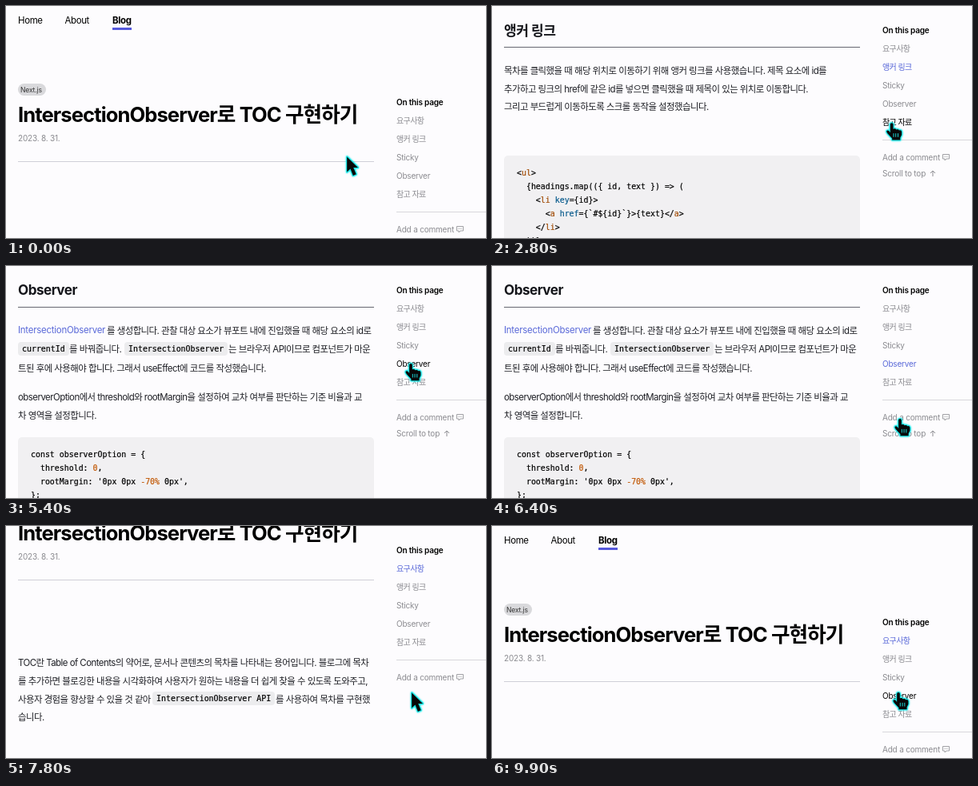
Animation, 600 px wide and 290 px high, one loop 10 s. Source, as an HTML page:

```html
<!DOCTYPE html>
<html lang="ko">
<head>
<meta charset="utf-8">
<style>
html, body { margin: 0; width: 100%; height: 100%; overflow: hidden; }
body { position: relative; background: #fdfcfe; color: #1e1f25; font: 11.43px/20px Inter, "Noto Sans CJK KR", "Noto Sans CJK", sans-serif; }
#page, #toc { position: absolute; left: 0; top: 0; width: 600px; }
.t { position: absolute; white-space: pre; letter-spacing: -.02em; }
.ko { letter-spacing: -.046em; margin-top: .8px; }
.nav { color: #000; letter-spacing: -.03em; }
.on { font-weight: 700; }
.title { font-size: 25.6px; font-weight: 700; color: #000; letter-spacing: -.036em; }
.h2 { font-size: 17.1px; font-weight: 700; color: #15161b; letter-spacing: -.03em; }
.small { font-size: 10px; color: #8b8b90; }
.badge { font-size: 8.57px; color: #333; }
.head { font-size: 10px; font-weight: 600; color: #000; }
.small.ko { letter-spacing: -.06em; margin-top: 0; }
.link { color: #5968d8; }
.c, pre { font-family: "DejaVu Sans Mono", monospace; font-size: 9.92px; letter-spacing: 0; color: #000; -webkit-text-stroke: .2px; }
.c { line-height: 17px; margin: 1.5px 0 0 -5px; padding: 0 5px; border-radius: 4px; background: #ececee; }
.box { position: absolute; }
pre { position: absolute; left: 15px; width: 429px; margin: 0; padding: 13px 0 13px 16px; line-height: 17px; border-radius: 5px; background: #f1f0f2; }
.tag { color: #a04a04; } .attr { color: #075a8c; } .str { color: #3d6a00; } .num { color: #c25a08; }
svg { position: absolute; overflow: visible; fill: none; }
#cursor { left: 0; top: 0; filter: drop-shadow(0 0 1px #0ee); }
#cursor path { fill: #080808; stroke: #1ee6e6; stroke-width: 2.4; stroke-linejoin: round; paint-order: stroke; }
#cursor .gap { stroke-width: 1; }
</style>
</head>
<body>
<div id="page"></div>
<div id="toc"></div>
<svg id="cursor" width="1" height="1">
  <path id="arrow" transform="translate(-.8 .5) scale(.96 1)" d="M0 0V19l4.5-4 3.5 8.5 4-1.7-3.6-8.3h6z"/>
  <g id="hand" transform="scale(.92)">
    <path d="M-2 2a2 2 0 0 1 4 0v6q3-1 4 1 3-1 4 1 3-1 3.5 2v4l-2 4v3H.5v-2l-6-6.500q-3-4 0-4.500 2 0 3.500 3z"/>
    <path class="gap" d="M2.500 14v5M5.500 14v5M8.500 14v5"/>
  </g>
</svg>
<script>
const $ = id => document.getElementById(id);
let layer = $('page');

function add(html) {
  layer.insertAdjacentHTML('beforeend', html);
  return layer.lastElementChild;
}
// Text whose line is centred on y
function text(x, y, str, cls = '') {
  const ko = /[가-힣]/.test(str) ? 'ko' : '';
  return add(`<div class="t ${ko} ${cls}" style="left:${x}px;top:${y - 10}px">${str}</div>`);
}
const box = (x, y, w, h, color, r = 0) =>
  add(`<div class="box" style="left:${x}px;top:${y}px;width:${w}px;height:${h}px;background:${color};border-radius:${r}px"></div>`);
const inline = (x, y, str) => text(x, y, str, 'c');
const lines = (y, step, list) => list.forEach((s, i) => text(15, y + i * step, s));

function heading(y, str) {
  text(15, y, str, 'h2');
  box(15, y + 21, 445, 1, '#666770');
}
function code(y, src) {
  const span = (cls, s) => `<span class="${cls}">${s}</span>`;
  const token = /(<\/?)(\w+)|(\w+)(?==['{])|('[^']*'(?=>))|(-\d+%|\b0(?=,))/g;
  const html = src.replace(token, (m, open, tag, attr, str, num) =>
    tag ? open.replace('<', '&lt;') + span('tag', tag) :
    attr ? span('attr', attr) : str ? span('str', str) : span('num', num));
  add(`<pre style="top:${y}px">${html}</pre>`);
}

const heads = [480, 720, 1145, 1530];
const names = ['요구사항', '앵커 링크', 'Sticky', 'Observer', '참고 자료'];

// Page header and introduction
text(15, 18, 'Home', 'nav');
text(73.5, 18, 'About', 'nav');
text(133, 18, 'Blog', 'nav on');
box(133, 27, 24, 3, '#5558dc');
box(15, 97, 34.5, 15, '#d9d9dc', 7.5);
text(18, 104.5, 'Next.js', 'badge');
text(15, 135, 'IntersectionObserver로 TOC 구현하기', 'title');
text(15, 164.5, '2023. 8. 31.', 'small');
box(15, 194, 445, 1, '#cfcfd8');
lines(297, 22.9, [
  'TOC란 Table of Contents의 약어로, 문서나 콘텐츠의 목차를 나타내는 용어입니다. 블로그에 목차',
  '를 추가하면 블로깅한 내용을 시각화하여 사용자가 원하는 내용을 더 쉽게 찾을 수 있도록 도와주고,',
  '사용자 경험을 향상할 수 있을 것 같아',
  '습니다.']);
inline(188, 342, 'IntersectionObserver API');
text(337, 342.8, '를 사용하여 목차를 구현했');

heads.forEach((y, i) => heading(y, names[i]));

lines(530, 22.8, [
  '• 목차를 클릭하면 해당 위치로 이동한다.',
  '• 스크롤 하는 동안 목차가 화면에 유지된다.',
  '• 현재 보고 있는 위치를 목차에 표시한다.']);

lines(770, 22.8, [
  '목차를 클릭했을 때 해당 위치로 이동하기 위해 앵커 링크를 사용했습니다. 제목 요소에 id를',
  '추가하고 링크의 href에 같은 id를 넣으면 클릭했을 때 제목이 있는 위치로 이동합니다.',
  '그리고 부드럽게 이동하도록 스크롤 동작을 설정했습니다.']);
code(877, `<ul>
  {headings.map(({ id, text }) => (
    <li key={id}>
      <a href={\`#\${id}\`}>{text}</a>
    </li>
  ))}
</ul>`);

text(15, 1195, '사용자가 스크롤 하는 동안 뷰포트에 TOC를 유지하기 위해');
inline(282, 1195.5, 'position: sticky; top: 0;');
text(440, 1195, '을 추');
text(15, 1218.5, '가했습니다. 그리고 TOC 컴포넌트의 부모가');
inline(218, 1219, 'flex');
text(246, 1218.5, '컨테이너라 section의 높이가 늘려져서');
inline(20, 1242.5, 'position: sticky');
text(121, 1242.5, '가 무시됐습니다. 그래서 늘어나지 않도록 하기 위해');
inline(355, 1242.5, 'align-self: flex-');
inline(15, 1266.5, 'start').style.cssText += 'margin-left:0;padding-left:0';
text(53, 1266.5, '를 추가했습니다.');
code(1296, `<section className='sticky top-0 self-start'>
    <ul>
        ...
    </ul>
</section>`);

text(15, 1580, 'IntersectionObserver', 'link');
text(126, 1580, '를 생성합니다. 관찰 대상 요소가 뷰포트 내에 진입했을 때 해당 요소의 id로');
inline(20, 1603, 'currentId');
text(79, 1603, '를 바꿔줍니다.');
inline(153, 1603, 'IntersectionObserver');
text(278, 1603, '는 브라우저 API이므로 컴포넌트가 마운');
text(15, 1627, '트된 후에 사용해야 합니다. 그래서 useEffect에 코드를 작성했습니다.');
lines(1663, 23, [
  'observerOption에서 threshold와 rootMargin을 설정하여 교차 여부를 판단하는 기준 비율과 교',
  '차 영역을 설정합니다.']);
code(1714, `const observerOption = {
  threshold: 0,
  rootMargin: '0px 0px -70% 0px',
};`);

// Table of contents, relative to its heading
layer = $('toc');
text(488, 0, 'On this page', 'head');
const itemY = i => 23.3 + 22.9 * i;
const items = names.map((s, i) => text(488, itemY(i), s, 'small'));
box(488, 137, 112, 1, '#d8d8dc');
text(488, 159, 'Add a comment', 'small');
add(`<svg style="left:563px;top:155px" width="10" height="9" stroke="#8b8b90" stroke-width=".8">
  <path d="M.5.500h8v5.500H5l-2 2v-2H.5zM2.200 3.300h1M4 3.300h1M5.800 3.300h1"/></svg>`);
const toTop = add('<div></div>');
layer = toTop;
text(488, 179, 'Scroll to top', 'small');
add(`<svg style="left:547px;top:175px" width="8" height="9" stroke="#8b8b90"><path d="M4 8V1M1 4 4 1l3 3"/></svg>`);

const scrollKeys = [[0, 0], [1850, 0], [2300, 690], [3620, 690], [3980, 1115], [5000, 1115], [5380, 1500], [7164.5, 1500], [7964.5, 0]];
const cursorKeys = [[0, 427, 188], [150, 427, 188], [1150, 498, 164], [2500, 498, 164], [3300, 504, 101], [4400, 504, 101],
  [4750, 506, 122], [5550, 506, 122], [5800, 510, 191], [6400, 510, 191], [6800, 508, 208]];

const ease = u => u < .5 ? 2 * u * u : 1 - 2 * (1 - u) ** 2;
function at(keys, t) {
  const i = keys.findIndex(k => k[0] > t);
  if (i < 0) return keys.at(-1).slice(1);
  const [a, b] = [keys[i - 1], keys[i]];
  const u = ease((t - a[0]) / (b[0] - a[0]));
  return a.slice(1).map((v, j) => v + (b[j + 1] - v) * u);
}
// The last heading to enter the top of the view is active
function activeItem(t, scroll) {
  if (t > 7100) return heads.findIndex(y => y > scroll);
  return heads.filter(y => y - scroll < 87).length - 1;
}

function draw(now) {
  const t = Math.floor(now % 10000 / 100) * 100;
  const scroll = Math.round(at(scrollKeys, t)[0]);
  const [x, y] = at(cursorKeys, t);
  const tocY = Math.max(30, 120 - scroll);
  const active = activeItem(t, scroll);
  const showTop = scroll > 300;
  const over = (dy, reach) => x > 487 && Math.abs(y - tocY - dy) < reach;

  $('page').style.transform = `translateY(${-scroll}px)`;
  $('toc').style.transform = `translateY(${tocY}px)`;
  toTop.style.display = showTop ? '' : 'none';
  items.forEach((el, i) => {
    el.style.color = over(itemY(i), 10) ? '#000' : i === active ? '#5968d8' : '';
  });
  const hand = items.some((_, i) => over(itemY(i), 10)) || over(159, 10) || showTop && over(179, 10);
  $('hand').style.display = hand ? '' : 'none';
  $('arrow').style.display = hand ? 'none' : '';
  $('cursor').style.transform = `translate(${x}px,${y}px)`;
}

const start = performance.now();
function frame() {
  draw(performance.now() - start);
  requestAnimationFrame(frame);
}
frame();
</script>
</body>
</html>
```
